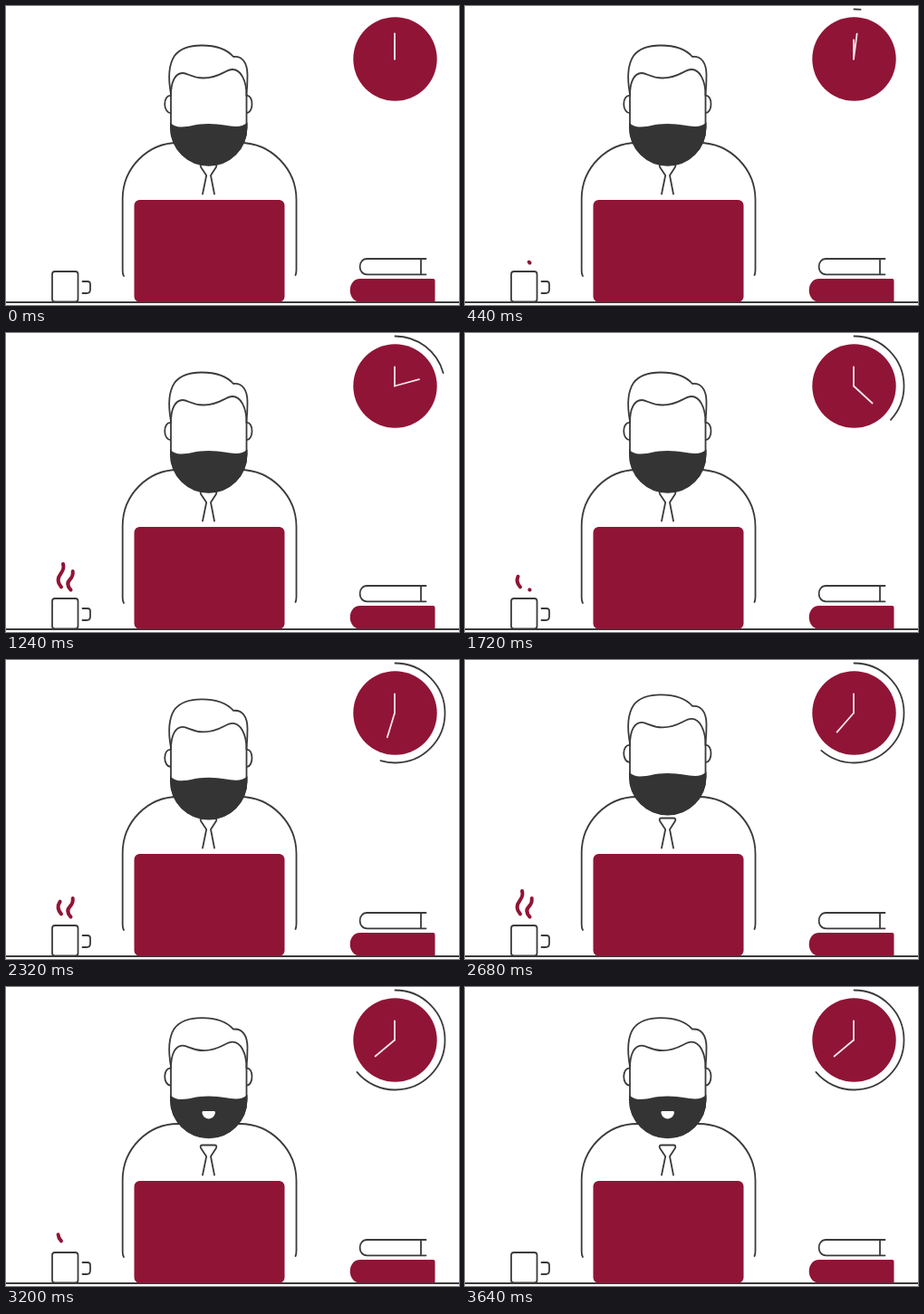
Animation, 500 px wide and 330 px high, one loop 4000 ms. Source, as an HTML page with a canvas:

```html
<!DOCTYPE html>
<html lang="en">
<head>
<meta charset="utf-8">
<title>At the desk</title>
<style>
html, body { margin: 0; width: 100%; height: 100%; overflow: hidden; background: #fff; }
canvas { display: block; width: 500px; height: 330px; }
</style>
</head>
<body>
<canvas id="stage"></canvas>
<script>
const W = 500, H = 330, LOOP = 4000, STEP = 40;
const INK = '#3b3b3b', RED = '#901436', BEARD = '#343434', WHITE = '#fff';

const canvas = document.getElementById('stage');
const ctx = canvas.getContext('2d');
const dpr = window.devicePixelRatio || 1;
canvas.width = W * dpr;
canvas.height = H * dpr;

const clamp = v => Math.min(1, Math.max(0, v));
const ease = v => (1 - Math.cos(Math.PI * clamp(v))) / 2;
const between = (t, a, b) => ease((t - a) / (b - a));

const shape = {
  body: new Path2D('M130 298 Q128.7 296 128.7 292 V213 C128.7 179 156 151 190 151 H202 ' +
                   'M319.5 297 Q320.5 295 320.5 291 V214 C320.5 180 293 151 258 151 H246'),
  tie: new Path2D('M217 207.5 L221.2 187 L215.2 178 Q213.5 174.5 217 174.5 H230 Q233.5 174.5 231.8 178 L226 187 L230 207.5'),
  mug: new Path2D('M54 293 H76.5 Q79.5 293 79.5 296 V323.5 Q79.5 326.5 76.5 326.5 H54 Q51 326.5 51 323.5 V296 Q51 293 54 293 Z ' +
                  'M84.5 304 H90 Q93 304 93 307 V313 Q93 317 89 317 H84.5'),
  bookTop: new Path2D('M463.5 279 H398.5 C388 279 388 296.3 398.5 296.3 H463.5 M458 279 V296.3'),
  bookLow: new Path2D('M391 301 H471.5 Q473.5 301 473.5 303 V326.5 H391 C376 326.5 376 301 391 301 Z'),
  ears: new Path2D('M182 99 C173 98 173 118 182 118 M265.5 99 C273.5 98 273.5 118 265.5 118'),
  face: new Path2D('M182 134 V97 C180 86 178 67 186 55 C192 47 203 43.5 216 43.5 C232 43.5 244 48 251 56 ' +
                   'C261 55 266.5 63 266.5 76 Q266.5 88 265.5 97 V134 A41.75 41.75 0 0 1 182 134 Z'),
  fringe: new Path2D('M182 99 C182 83 187 74 195 74 C201 74 205 79.5 218 79.5 C236 79.5 242 70 250 70 C259 70 265.5 82 265.5 99'),
  beard: new Path2D('M181 128.5 Q186 133.5 193 133.5 C203 133.5 209 130 223.5 130 C238 130 246 133 254 133 ' +
                    'Q261 133 266.5 128.5 V134 A42.75 42.25 0 0 1 181 134 Z'),
  smile: new Path2D('M-6 -4.2 H6 Q7.7 -4.2 7.2 -2.2 C5.5 6.3 -5.5 6.3 -7.2 -2.2 Q-7.7 -4.2 -6 -4.2 Z')
};

const wisps = [
  { path: new Path2D('M61 280.3 C56 275 57 270 60.5 265.5 C64 261 64 258 63 255'), len: 28, start: 590 },
  { path: new Path2D('M71.5 283.5 C67 279 67.5 275 71 271.5 C74 268.5 74 266 73.7 263'), len: 22.5, start: 350 }
];
const PULSE = 1415;

function line(path, color = INK, width = 1.8) {
  ctx.strokeStyle = color;
  ctx.lineWidth = width;
  ctx.stroke(path);
}

function fill(path, color) {
  ctx.fillStyle = color;
  ctx.fill(path);
}

// Each wisp grows from the cup and shrinks back, twice per loop.
function steam(t) {
  for (const { path, len, start } of wisps) {
    const u = (t - start) / PULSE;
    if (u <= 0 || u >= 2) continue;
    const grow = Math.min(1, 1.25 * Math.sin(Math.PI * u) ** 2);
    ctx.setLineDash([Math.max(0.1, grow * len * 1.03), 100]);
    line(path, RED, 4);
  }
  ctx.setLineDash([]);
}

function hand(angle, length) {
  const p = new Path2D();
  p.moveTo(0, 0);
  p.lineTo(length * Math.sin(angle), -length * Math.cos(angle));
  line(p, '#f6e6ea', 1.8);
}

function clock(t) {
  const angle = between(t, 100, 3050) * 230 * Math.PI / 180;
  ctx.save();
  ctx.translate(429.5, 58.5);
  const face = new Path2D();
  face.arc(0, 0, 46.2, 0, 2 * Math.PI);
  fill(face, RED);
  ctx.translate(-0.5, 0);
  hand(0, 21);
  hand(angle, 28);
  ctx.translate(0.5, 0);
  if (angle > 0) {
    const trail = new Path2D();
    trail.arc(0, 0, 55, -Math.PI / 2, angle - Math.PI / 2);
    line(trail);
  }
  ctx.restore();
}

function head(t) {
  ctx.save();
  ctx.translate(0, -9.4 * between(t, 2250, 3070));
  line(shape.ears);
  fill(shape.face, WHITE);
  line(shape.face);
  line(shape.fringe);
  fill(shape.beard, BEARD);
  const show = between(t, 2720, 3020);
  if (show > 0) {
    ctx.globalAlpha = show;
    ctx.translate(223.7, 150.7);
    ctx.scale(0.85 + 0.15 * show, 0.85 + 0.15 * show);
    fill(shape.smile, WHITE);
  }
  ctx.restore();
}

function draw(t) {
  ctx.setTransform(dpr, 0, 0, dpr, 0, 0);
  ctx.fillStyle = WHITE;
  ctx.fillRect(0, 0, W, H);
  ctx.lineCap = ctx.lineJoin = 'round';

  line(shape.body);
  line(shape.tie);
  head(t);

  line(new Path2D('M0 327 H500'));
  const laptop = new Path2D();
  laptop.roundRect(141.5, 214, 166, 112.7, 6);
  fill(laptop, RED);
  line(shape.mug);
  line(shape.bookTop);
  fill(shape.bookLow, RED);

  steam(t);
  clock(t);
}

const begin = performance.now();
function tick() {
  const t = (performance.now() - begin) % LOOP;
  draw(Math.min(3640, Math.floor(t / STEP) * STEP));
  requestAnimationFrame(tick);
}
tick();
</script>
</body>
</html>
```
